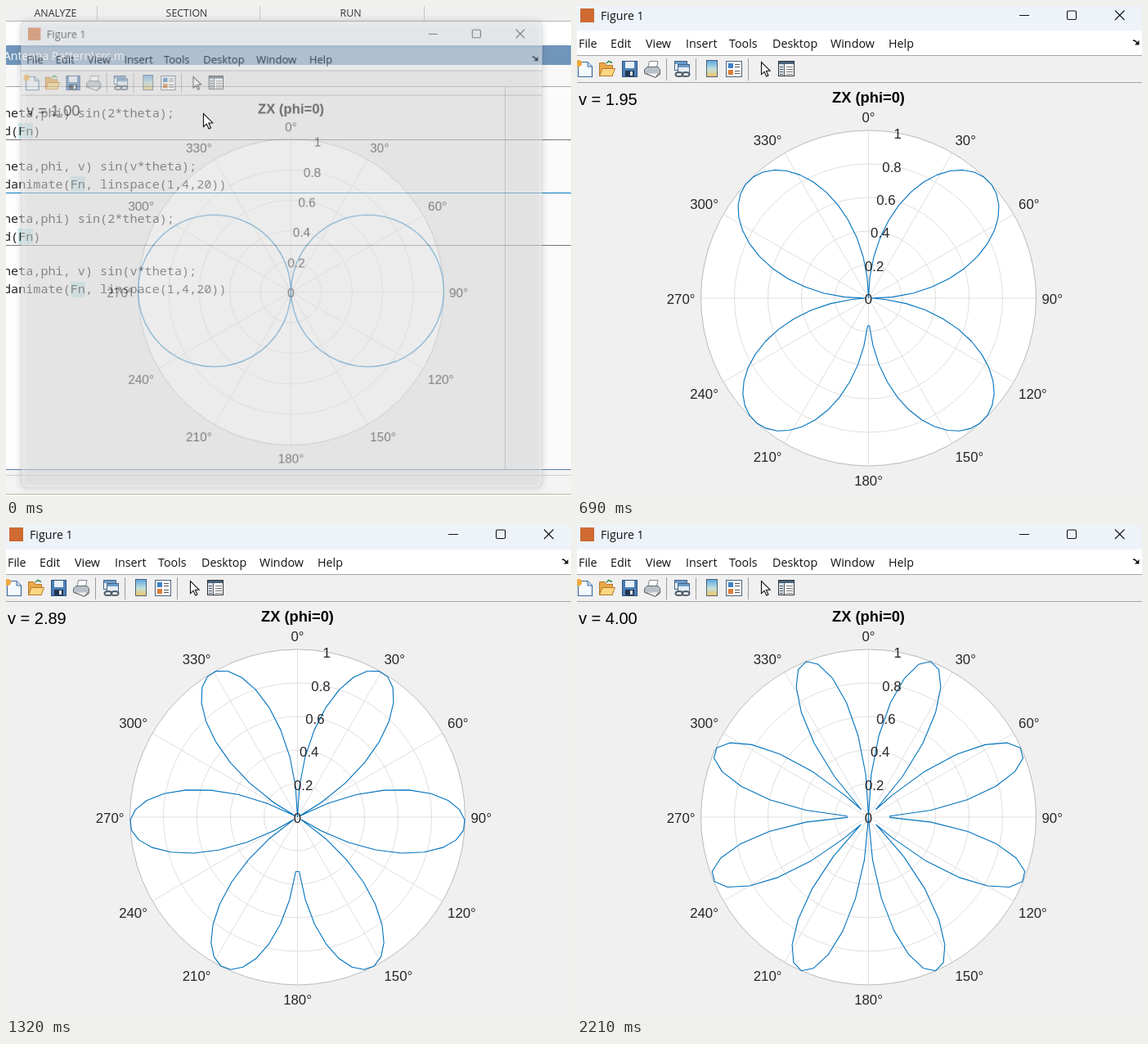
Animation, 691 px wide and 600 px high, one loop 2.99 s. Source, as an HTML page with a canvas:

```html
<!DOCTYPE html>
<html lang="en">
<head>
<meta charset="utf-8">
<title>Polar pattern</title>
<style>
html, body { margin: 0; width: 100%; height: 100%; overflow: hidden; background: #fff; }
canvas { display: block; }
</style>
</head>
<body>
<canvas id="stage" width="691" height="600"></canvas>
<script>
const LOOP = 2990;
const STEPS = [0, 140, 220, 300, 460, 530, 690, 770, 920, 1010,
  1170, 1250, 1320, 1490, 1570, 1740, 1890, 1980, 2140, 2210];
// window pose while it opens: centre, scale, opacity, pointer
const POSES = [
  { t: 0, x: 348.5, y: 349.5, s: 0.9125, a: 0.5, pointer: [241, 131] },
  { t: 80, x: 354.5, y: 355.3, s: 0.975, a: 0.88, pointer: [452, 322] },
  { t: 140, x: 356.1, y: 356.8, s: 0.995, a: 1, pointer: [612, 467] },
  { t: 220, x: 356.5, y: 357, s: 1, a: 1 }
];
const CX = 356.5, CY = 357, R = 205, PAD = 6;
const UI = '"Open Sans", "Noto Sans", sans-serif';
const SANS = '"Liberation Sans", Arial, sans-serif';
const MONO = '"Noto Sans Mono", "DejaVu Sans Mono", monospace';

const stage = document.getElementById('stage').getContext('2d');
const layer = document.createElement('canvas');
layer.width = 700;
layer.height = 626;
const win = layer.getContext('2d');

function rect(c, x, y, w, h, fill, stroke) {
  if (fill) { c.fillStyle = fill; c.fillRect(x, y, w, h); }
  if (stroke) { c.strokeStyle = stroke; c.lineWidth = 1; c.strokeRect(x + 0.5, y + 0.5, w - 1, h - 1); }
}

function path(c, pts, stroke, fill, width = 1, close = false) {
  c.beginPath();
  pts.forEach(([x, y], i) => i ? c.lineTo(x, y) : c.moveTo(x, y));
  if (close) c.closePath();
  if (fill) { c.fillStyle = fill; c.fill(); }
  if (stroke) { c.strokeStyle = stroke; c.lineWidth = width; c.stroke(); }
}

// y is the middle of the capitals
function text(c, str, x, y, size, family, color, align = 'left', weight = '') {
  c.font = `${weight} ${size}px ${family}`;
  c.fillStyle = color;
  c.textAlign = align;
  c.fillText(str, x, y + size * 0.358);
}

function arrow(c, x, y, k, stroke) {
  const shape = [[0, 0], [0, 16], [3.8, 12.6], [6.6, 18.6], [9, 17.5], [6.3, 11.6], [11.3, 11.2]];
  path(c, shape.map(([px, py]) => [x + px * k, y + py * k]), stroke, '#fff', 1.1, true);
}

function drawEditor(c) {
  rect(c, 0, 0, 691, 600, '#fff');
  rect(c, 0, 0, 691, 18, '#f0f0f0');
  rect(c, 0, 18, 691, 1, '#b4b4b4');
  for (const x of [111, 310, 511]) rect(c, x, 0, 1, 17, '#c8c8c8');
  text(c, 'ANALYZE', 60.5, 8.5, 12.4, UI, '#333', 'center');
  text(c, 'SECTION', 221, 8.5, 12.4, UI, '#333', 'center');
  text(c, 'RUN', 421.5, 8.5, 12.4, UI, '#333', 'center');
  rect(c, 0, 48, 691, 24, '#7196bb');
  text(c, 'Antenna Pattern\\src.m', -3, 60.5, 14, UI, '#fff');
  rect(c, 0, 72, 691, 26, '#f8f8f8');
  rect(c, 0, 98, 691, 1, '#a8a8a8');
  rect(c, 611, 99, 80, 468, '#fbfbfb');
  rect(c, 610, 99, 1, 468, '#b0b0b0');
  for (const y of [163, 292]) rect(c, 0, y, 691, 1, '#777');
  rect(c, 0, 228, 691, 1, '#0a78c2');
  for (const [x, y] of [[15, 152], [79, 217], [15, 281], [79, 346]])
    rect(c, x, y - 9, 18, 19, '#cdeff2');
  const code = ['heta,phi) sin(2*theta);', 'd(Fn)', 'heta,phi, v) sin(v*theta);',
    'danimate(Fn, linspace(1,4,20))'];
  [131, 196, 260, 324].forEach((y, i) => {
    const k = i % 2 * 2;
    text(c, code[k], -3, y, 15.15, MONO, '#222');
    text(c, code[k + 1], -3, y + 21.5, 15.15, MONO, '#222');
  });
  rect(c, 0, 567, 691, 33, '#f3f3f3');
  rect(c, 0, 566, 691, 1, '#5a7fb0');
  rect(c, 0, 573, 691, 1, '#d0d0d0');
  rect(c, 0, 596, 691, 1, '#b8b8b8');
  rect(c, 0, 597, 691, 3, '#f6f6ea');
}

function drawIcons(c) {
  const blue = '#3d6a9c';
  // new
  path(c, [[1.5, 68.5], [13, 68.5], [18.5, 74], [18.5, 86.5], [1.5, 86.5]], blue, '#f4f9fd', 1.2, true);
  path(c, [[13, 68.5], [13, 74], [18.5, 74]], blue, '#cfe0ee', 1);
  c.fillStyle = '#f0a93c';
  c.beginPath(); c.arc(2, 70, 4, 0, 7); c.fill();
  // open
  path(c, [[27.5, 85.5], [27.5, 69.5], [34, 69.5], [36, 72.5], [43.5, 72.5], [43.5, 85.5]], '#b9772a', '#e9a849', 1, true);
  path(c, [[27.5, 85.5], [31, 76.5], [46.5, 76.5], [43, 85.5]], '#b9772a', '#fbd680', 1, true);
  path(c, [[36, 70], [39, 67.5], [43, 69.5]], '#2c8b46', null, 1.6);
  // save
  rect(c, 55, 67, 19, 20, '#4c7fb8', '#2d4f7c');
  rect(c, 59, 68, 11, 8, '#e9f1f8');
  rect(c, 59, 79, 11, 7, '#24364d');
  rect(c, 65, 80, 3, 5, '#e3e9ef');
  // print
  path(c, [[86.5, 77], [88.5, 67.5], [99, 67.5], [97, 77]], '#7d8790', '#fff', 1, true);
  path(c, [[82.5, 77.5], [86, 74.5], [99, 74.5], [101.5, 77.5], [101.5, 83.5], [97, 86.5], [82.5, 82.5]], '#606870', '#b9c0c7', 1, true);
  path(c, [[85, 83], [96, 87.5], [100, 82]], '#555', '#eee');
  // link
  rect(c, 119, 67, 16, 12, '#fff', '#426184');
  rect(c, 120, 68, 14, 3, '#6c9cca');
  rect(c, 123, 71, 15, 11, '#e5eef7', '#426184');
  rect(c, 124, 72, 13, 3, '#6c9cca');
  c.lineWidth = 2; c.strokeStyle = '#4d5c6b';
  for (const x of [125, 133]) { c.beginPath(); c.ellipse(x, 83.5, 4.5, 2.6, 0, 0, 7); c.stroke(); }
  // colorbar
  const g = c.createLinearGradient(0, 67, 0, 87);
  g.addColorStop(0, '#5fa8e4'); g.addColorStop(0.5, '#bfe0dc'); g.addColorStop(1, '#f5c45c');
  rect(c, 158, 66, 14, 21, g, '#4a6076');
  // legend
  rect(c, 182, 67, 20, 20, '#fff', '#49627c');
  rect(c, 185, 70, 6, 6, '#3f7fc4');
  rect(c, 185, 78, 6, 6, '#dc7d3a');
  for (const y of [71, 74, 79, 82]) rect(c, 193, y, 6, 1, '#555');
  // pointer and inspector
  arrow(c, 225.5, 68.5, 0.94, '#111');
  rect(c, 246, 67, 20, 19, '#fff', '#333');
  rect(c, 247, 68, 18, 3, '#49627c');
  rect(c, 247, 71, 6, 14, '#d8e2ec');
  rect(c, 253, 71, 1, 14, '#555');
  for (const y of [74, 77, 80, 83]) { rect(c, 248, y, 4, 1, '#555'); rect(c, 256, y, 8, 1, '#777'); }
}

function drawChrome(c) {
  rect(c, -PAD, -PAD, 700, 36, '#edf3f9');
  rect(c, 4, 3, 17, 17, '#cf6a32');
  text(c, 'Figure 1', 29, 12, 14.2, UI, '#111');
  rect(c, 541, 11, 12, 1, '#111');
  c.strokeStyle = '#111';
  c.lineWidth = 1.1;
  c.beginPath(); c.roundRect(599.5, 6, 11, 10.5, 1.5); c.stroke();
  path(c, [[658, 5.5], [669.5, 17]], '#111', null, 1.1);
  path(c, [[669.5, 5.5], [658, 17]], '#111', null, 1.1);

  rect(c, -PAD, 30, 700, 30, '#fff');
  const menu = { File: 2, Edit: 41, View: 84, Insert: 133, Tools: 186, Desktop: 239, Window: 310, Help: 381 };
  for (const name in menu) text(c, name, menu[name], 46, 14.3, UI, '#111');
  path(c, [[680, 42], [682.5, 42.5], [685.5, 45.5]], '#111', null, 1.5);
  path(c, [[687.5, 42], [687.5, 47.5], [682, 47.5]], null, '#111', 1, true);

  rect(c, -PAD, 60, 700, 34, '#f0f0f0');
  rect(c, -PAD, 60, 700, 1, '#a6a6a6');
  rect(c, -PAD, 93, 700, 1, '#a6a6a6');
  for (const x of [109, 145, 209]) rect(c, x, 64, 1, 27, '#9c9c9c');
  drawIcons(c);
}

const at = (deg, r) => {
  const a = deg * Math.PI / 180;
  return [CX + r * Math.sin(a), CY - r * Math.cos(a)];
};

function ring(c, r, stroke, fill) {
  c.beginPath();
  c.arc(CX, CY, r, 0, 2 * Math.PI);
  if (fill) { c.fillStyle = fill; c.fill(); }
  c.strokeStyle = stroke;
  c.lineWidth = 1;
  c.stroke();
}

function drawPlot(c, v) {
  rect(c, -PAD, 94, 700, 530, '#f0f0f0');
  text(c, 'v = ' + v.toFixed(2), 2, 114, 20, SANS, '#000');
  text(c, 'ZX (phi=0)', CX, 111, 18.3, SANS, '#000', 'center', 'bold');

  ring(c, R, '#b9b9b9', '#fff');
  for (let i = 1; i < 5; i++) ring(c, R * i / 5, '#dfdfdf');
  for (let d = 0; d < 180; d += 30) path(c, [at(d, R), at(d + 180, R)], '#dfdfdf');

  // half sweep of theta, mirrored, spread over 100 plot angles
  const half = [];
  for (let i = 0; i < 50; i++)
    half.push([i * 360 / 99, R * Math.abs(Math.sin(v * Math.PI * i / 49))]);
  const mirror = half.map(([d, r]) => [360 - d, r]).reverse();
  c.lineJoin = 'round';
  path(c, half.concat(mirror).map(p => at(...p)), '#0072bd', null, 1.1);
  c.lineJoin = 'miter';

  for (let d = 0; d < 360; d += 30) {
    const [x, y] = at(d, 212);
    const side = Math.round(Math.sin(d * Math.PI / 180) * 10);
    const up = Math.round(Math.cos(d * Math.PI / 180) * 10);
    const align = side > 0 ? 'left' : side < 0 ? 'right' : 'center';
    text(c, d + '°', x, y + 0.8 - Math.sign(up) * 9.9, 16.8, SANS, '#262626', align);
  }
  for (let i = 0; i <= 5; i++) {
    const [x, y] = at(10, R * i / 5);
    text(c, String(i / 5), x, y + 1, 16.8, SANS, '#262626', 'center');
  }
}

function drawWindow(v) {
  win.setTransform(1, 0, 0, 1, 0, 0);
  win.clearRect(0, 0, layer.width, layer.height);
  win.save();
  win.beginPath();
  win.roundRect(0, 0, layer.width, layer.height, 9);
  win.clip();
  win.translate(PAD, PAD);
  drawPlot(win, v);
  drawChrome(win);
  win.restore();
  win.strokeStyle = '#b5b5b5';
  win.lineWidth = 1;
  win.beginPath();
  win.roundRect(0.5, 0.5, layer.width - 1, layer.height - 1, 9);
  win.stroke();
}

const lastIndex = (list, test) => list.reduce((n, item, i) => test(item) ? i : n, 0);

function render(t) {
  const step = lastIndex(STEPS, s => s <= t);
  const pose = POSES[lastIndex(POSES, p => p.t <= t)];
  drawWindow(1 + 3 * step / 19);
  drawEditor(stage);
  stage.save();
  stage.globalAlpha = pose.a;
  if (pose.s < 1) {
    stage.shadowColor = 'rgba(0,0,0,.3)';
    stage.shadowBlur = 8;
  }
  stage.translate(pose.x, pose.y);
  stage.scale(pose.s, pose.s);
  stage.drawImage(layer, -CX - PAD, -CY - PAD);
  stage.restore();
  if (pose.pointer) arrow(stage, pose.pointer[0] + 0.5, pose.pointer[1] + 0.5, 1, '#111');
}

// even out the half pixel of the resting pose
POSES[3].x = CX;

const start = performance.now();
function tick() {
  render((performance.now() - start) % LOOP);
  requestAnimationFrame(tick);
}
tick();
</script>
</body>
</html>
```
